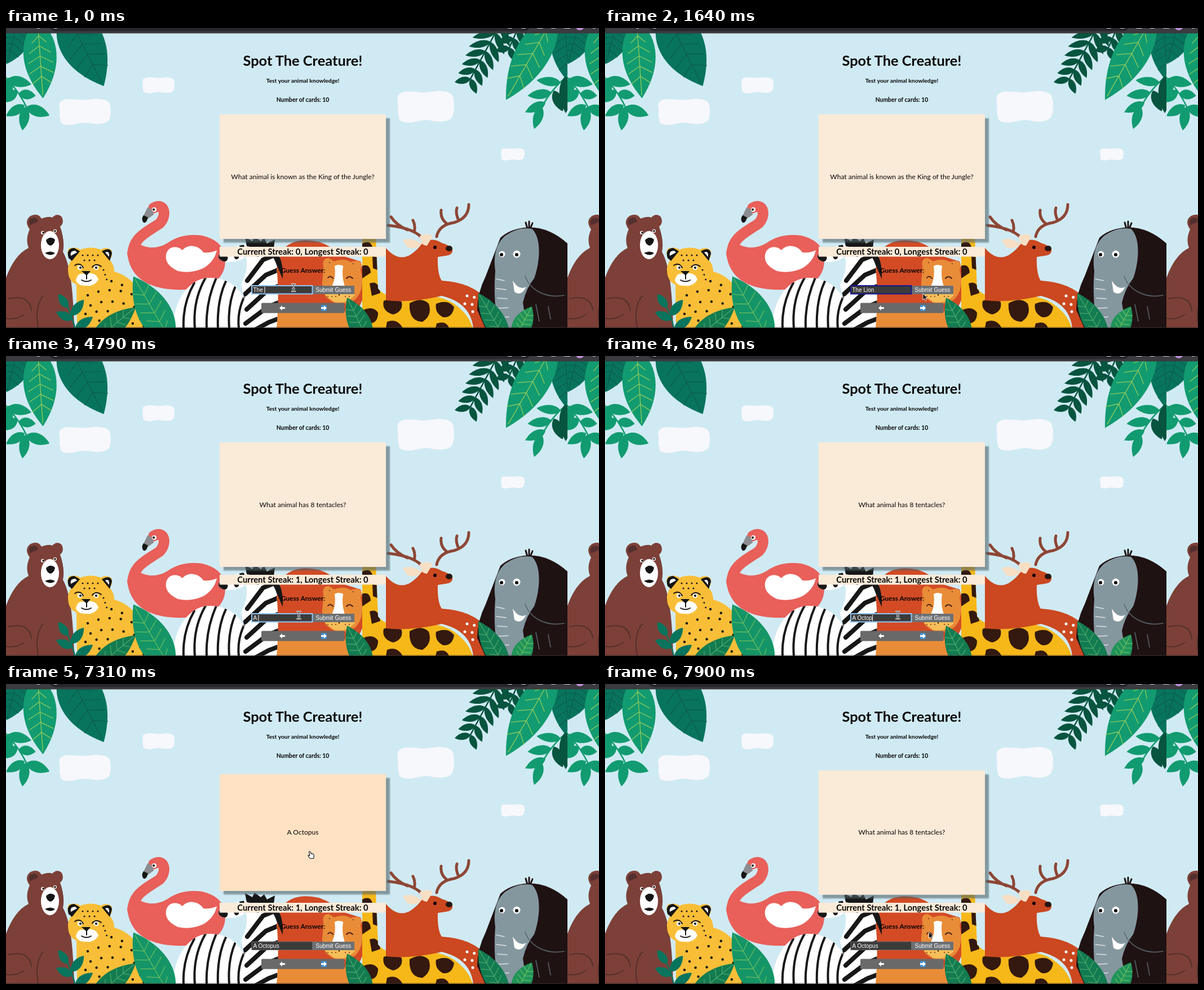
An HTML page that plays this animation: 1052 px wide and 532 px high, repeating every 8000 ms.

```html
<!DOCTYPE html>
<html lang="en">
<head>
<meta charset="utf-8">
<title>Animal quiz</title>
<style>
  html, body { margin: 0; width: 100%; height: 100%; overflow: hidden; background: #d0eaf3; }
  svg { display: block; width: 100%; height: 100%; }
  .line { fill: none; stroke-linecap: round; stroke-linejoin: round; }
  .page text { font-family: Lato, sans-serif; text-anchor: middle; fill: #050505; }
  .page .bold { font-weight: 700; }
  .form text { font: 10px "Liberation Sans", Arial, sans-serif; fill: #fff; white-space: pre; }
</style>
</head>
<body>
<svg viewBox="0 0 1052 532" preserveAspectRatio="none">
  <defs>
    <clipPath id="tileClip"><path d="M0 0H996V532H0Z"/></clipPath>
    <clipPath id="bodyClip"><path id="zebraBody" d="M296 532C298 482 325 443 361 443C395 443 416 462 424 484L417 455Q432 425 425 405Q414 418 386 414Q374 410 378 402Q400 386 425 384L448 374L472 385Q488 440 480 532Z"/></clipPath>
    <clipPath id="giraffeClip"><path id="giraffeBody" d="M632 532V368Q645 362 656 368L660 462Q676 482 715 476Q775 468 806 498Q822 512 828 532Z"/></clipPath>
    <filter id="soft" x="-10%" y="-10%" width="120%" height="120%"><feGaussianBlur stdDeviation="1"/></filter>
    <path id="cloud" d="M1 34C-2 14 6 1 22 3C38 3 42 7 55 5C72-1 88 0 96 13C101 25 101 65 97 81C91 97 76 99 62 94C47 88 38 95 25 99C10 101 1 94 3 79C-1 66 3 52 1 34Z"/>
    <path id="leaf" d="M0 0C.5 .15 .75 .55 0 1C-.75 .55 -.5 .15 0 0Z"/>
  </defs>

  <g id="tile" clip-path="url(#tileClip)">
    <path fill="#d0eaf3" d="M0 0H996V532H0Z"/>
    <g fill="#f7f8fb">
      <use href="#cloud" transform="translate(94 125) scale(.92 .47)"/>
      <use href="#cloud" transform="translate(242 87) scale(.57 .29)"/>
      <use href="#cloud" transform="translate(694 111) scale(1.01 .57)"/>
      <use href="#cloud" transform="translate(878 213) scale(.42 .22)"/>
    </g>

    <g id="flamingo">
      <path fill="#e95f5a" d="M215 396C218 447 260 466 316 464C370 462 394 440 388 402Q382 376 348 368Q312 363 287 381Q262 396 238 384Z"/>
      <path class="line" stroke="#e95f5a" stroke-width="19" d="M262 319C282 308 286 334 272 347C250 362 224 372 225 403"/>
      <path fill="#fff" d="M284 402C287 387 303 385 313 394C325 380 345 388 350 398Q366 399 374 394Q370 414 350 426Q328 436 305 431Q281 420 284 402Z"/>
      <path fill="#8b8d90" d="M251 318Q261 320 262 331L252 338L244 333Z"/>
      <path fill="#151515" d="M244 332L252 336Q249 347 244 345Q239 339 244 332Z"/>
      <circle cx="263" cy="322" r="4" fill="#fff"/><circle cx="262" cy="322" r="2"/>
    </g>

    <g id="bear">
      <path fill="#7c4038" d="M0 443Q15 402 40 390Q34 375 42 357Q31 342 44 333Q57 327 63 338Q75 333 82 336Q91 327 99 335Q104 346 96 352Q105 378 101 397C113 418 119 456 121 532H0Z"/>
      <path fill="#53302e" d="M42 350Q37 338 50 336Q56 337 57 343Z"/>
      <ellipse cx="78" cy="385" rx="16" ry="25" fill="#fff"/>
      <path d="M71 376Q79 368 87 375Q86 384 79 386Q72 384 71 376M69 399Q79 394 87 399Q80 406 69 399" fill="#151515"/>
      <circle cx="65" cy="363" r="3" fill="#fff"/><circle cx="87" cy="360" r="3" fill="#fff"/>
      <circle cx="66" cy="363" r="1.7"/><circle cx="87" cy="360" r="1.7"/>
      <path class="line" stroke="#57302c" stroke-width="2" d="M4 480Q42 472 45 501M66 475Q50 494 57 532M0 515Q19 518 32 508"/>
    </g>

    <g id="leopard">
      <path fill="#f9be37" d="M126 532L125 455Q109 449 110 425Q113 414 117 410Q104 400 112 391Q123 387 132 393Q151 386 168 393Q178 387 187 394Q190 404 184 411Q192 420 192 432C224 440 249 470 255 532Z"/>
      <path fill="#151515" d="M111 408Q106 391 121 390L131 396L117 413ZM170 396Q186 387 188 400L184 413Z"/>
      <path fill="#fff" d="M115 404Q113 395 123 395L126 398ZM176 398Q184 394 183 406ZM124 448Q126 433 140 436Q159 431 164 446Q157 459 141 457Q129 458 124 448Z"/>
      <path fill="#151515" d="M134 431L150 431L143 439Z"/>
      <path class="line" stroke="#151515" stroke-width="2" d="M122 421Q131 415 137 425M153 424Q160 416 169 423M143 438V445M134 447Q143 452 151 447"/>
      <circle cx="131" cy="425" r="4" fill="#fff"/><circle cx="160" cy="425" r="4" fill="#fff"/>
      <circle cx="132" cy="425" r="2"/><circle cx="160" cy="425" r="2"/>
      <g class="line" stroke="#181512">
        <path stroke-width="3" stroke-dasharray="0 9" d="M136 403H165M139 412H159M173 429L180 450"/>
        <path stroke-width="4.5" stroke-dasharray="0 20" d="M145 474Q190 454 236 478M150 492Q187 474 244 502M141 507Q190 493 247 520M146 523Q184 511 247 530M187 449L223 462"/>
      </g>
    </g>

    <g id="lion">
      <path fill="#d34b25" d="M469 532Q470 435 493 391Q514 370 555 379Q578 387 597 404L629 414Q640 450 633 480Q622 512 590 532Z"/>
      <path fill="#e98c38" d="M475 532V503Q502 484 546 498Q577 512 626 496L632 532ZM563 422Q560 408 573 408L582 414Q598 407 612 415Q629 409 631 421L629 429Q638 460 621 480Q607 492 584 488Q560 478 561 451Q563 436 563 422Z"/>
      <path fill="#fff" d="M583 422Q590 418 598 422Q595 440 601 458Q598 466 587 465Q577 464 579 456Q586 441 583 422Z"/>
      <path fill="#f7bf59" d="M566 474Q581 461 592 472Q606 461 619 473Q605 490 583 486Z"/>
      <path class="line" stroke="#4b231a" stroke-width="2" d="M571 443Q575 438 580 444M604 444Q609 438 615 444M583 462L591 466L599 462M591 466V474"/>
      <path class="line" stroke="#5f291b" stroke-width="2" stroke-dasharray="0 7" d="M571 476H586M602 476H615M574 416H578M616 418H621"/>
    </g>

    <g id="zebra">
      <use href="#zebraBody" fill="#fff"/>
      <g class="line" clip-path="url(#bodyClip)" stroke="#171717" stroke-width="4">
        <path d="M334 452Q313 489 315 532M354 443Q331 483 335 532M373 443Q354 487 356 532M391 447Q374 482 376 532M407 458Q393 490 396 532M422 478Q410 504 413 532"/>
        <path stroke-width="8" d="M490 397L456 411L428 448M495 424L461 438L424 472M495 453L463 466L427 499M495 482L464 495L425 524M495 511L466 522L435 539M440 382L447 402M417 383L423 399M399 388L409 406"/>
        <path stroke-width="13" d="M376 408L387 408"/>
      </g>
      <path fill="#171717" d="M427 387L424 371L437 378L441 370L452 378L458 373L463 382L477 375L475 390Q493 409 491 445L480 420Q472 396 451 391Z"/>
      <circle cx="413" cy="398" r="3"/>
    </g>

    <g id="giraffe">
      <use href="#giraffeBody" fill="#f6b719"/>
      <path clip-path="url(#giraffeClip)" fill="#33190f" d="M632 382Q646 375 650 388Q646 399 632 395ZM650 405L664 407V431L651 426ZM631 422Q646 417 647 434L632 444ZM645 453Q661 446 664 470L649 475ZM670 484Q690 475 702 486Q705 503 687 508Q666 502 670 484ZM716 488Q738 476 750 489Q757 509 739 521Q714 520 716 488ZM763 489Q784 480 795 495Q792 514 776 513Q760 506 763 489ZM634 500Q652 492 660 505Q660 524 644 524ZM676 521Q694 514 704 532H674ZM764 524Q781 518 786 532H762Z"/>
    </g>

    <g id="deer">
      <path class="line" stroke="#8d4635" stroke-width="5" d="M741 376Q727 355 678 350M712 358Q693 350 683 335M724 362Q727 351 722 341M764 370Q768 349 795 345Q821 337 821 313M782 347Q770 338 772 323M803 341Q797 328 800 319"/>
      <path fill="#cb4820" d="M674 483V390Q694 414 716 403Q731 393 737 383Q754 369 773 381Q789 386 792 393Q793 403 779 404L766 406Q765 436 773 448Q828 451 854 483L861 532H829Q824 487 773 475Q720 488 674 483Z"/>
      <path fill="#f6dfc5" d="M704 376Q719 370 738 383Q726 395 711 388ZM734 369Q747 362 757 369L747 386Q735 386 734 369Z"/>
      <ellipse cx="786" cy="391" rx="6" ry="5" fill="#241613"/><circle cx="761" cy="389" r="3"/>
      <path class="line" stroke="#fff" stroke-width="5" stroke-dasharray="0 13" d="M818 475L848 481M814 489L855 493M828 503L857 507"/>
    </g>

    <g id="elephant">
      <path fill="#1f1213" d="M836 500Q836 470 851 440L877 372Q893 357 920 354Q960 350 996 382V532H850Z"/>
      <path class="line" stroke="#1f1213" stroke-width="3" d="M925 356L922 345M928 355L928 343M930 356L934 346"/>
      <path fill="#84979f" d="M868 431Q862 388 886 368Q908 352 933 356C953 375 945 423 937 444Q923 461 917 487L924 532H873Q864 478 868 431Z"/>
      <path class="line" stroke="#5b666b" stroke-width="1.5" d="M921 440C930 466 960 480 990 474M940 490L946 520M962 494L966 516"/>
      <path fill="#fff" d="M899 448Q910 466 923 459Q914 477 902 468Z"/>
      <g fill="#fff"><circle cx="880" cy="401" r="5.5"/><circle cx="906" cy="401" r="6.5"/></g>
      <circle cx="879" cy="402" r="3"/><circle cx="906" cy="402" r="3"/>
      <path class="line" stroke="#dbe1e2" stroke-width="1.5" d="M870 445L884 448M870 462L887 464M872 479L889 480M874 497L891 496M877 514L892 512"/>
    </g>
    <g id="leaves"></g>
  </g>
  <use href="#tile" x="996"/>

  <path fill="#3a3b3e" d="M0 0H1052V9.5H0Z"/>
  <rect x="76" y="-20" width="855" height="25.5" rx="12" fill="#26272a"/>
  <path class="line" stroke="#c9cacd" stroke-width="2" d="M56 0H59M86 0H90M891 0H897M915 0H921M943 0H952M968 0H974M991 0H1000M1042 0H1045"/>
  <circle cx="1018" cy="-4" r="8" fill="#bd8bd2"/>
  <path fill="#30292a" opacity=".65" d="M0 530.5H1052V532H0Z"/>

  <g class="page">
    <text class="bold" x="526.5" y="67" font-size="25.4">Spot The Creature!</text>
    <text class="bold" x="526.5" y="97" font-size="10.3">Test your animal knowledge!</text>
    <text class="bold" x="526.5" y="131" font-size="10.4">Number of cards: 10</text>
    <g id="card">
      <path fill="#4f6269" opacity=".6" filter="url(#soft)" d="M386 160H681V380.5H386Z"/>
      <path id="face" d="M379 153H674V374H379Z"/>
      <text id="question" x="526.5" y="267.5" font-size="12.05"></text>
    </g>
    <path fill="#faead8" d="M379 388H674V405.5H379Z"/>
    <text id="streak" class="bold" x="526.5" y="401.5" font-size="14.8"></text>
    <text class="bold" x="527" y="434" font-size="12">Guess Answer:</text>
  </g>

  <g class="form">
    <rect id="submit" x="543" y="457" width="75" height="15" rx="1"/>
    <text x="549.5" y="467.7">Submit Guess</text>
    <rect id="field" x="436" y="457" width="107.5" height="14.5" fill="#3b3b3b"/>
    <text id="typed" x="438.5" y="467.7"></text>
    <path id="caret" stroke="#fff" d="M0 459V470"/>
    <rect x="453" y="487.5" width="147.5" height="18" rx="2" fill="#696969"/>
    <path id="next" fill="#797979" d="M526.5 487.5H598.5Q600.5 487.5 600.5 489.5V503.5Q600.5 505.5 598.5 505.5H526.5Z"/>
    <path id="arrow" fill="#fff" d="M485 496.5L490 492V495H495V498H490V501Z"/>
    <rect x="559" y="491.5" width="10" height="10" rx="1" fill="#3f93d3"/>
    <use href="#arrow" transform="translate(1054 0) scale(-1 1)"/>
  </g>

  <g id="cursor" stroke-linejoin="round">
    <g id="beam" class="line">
      <path stroke="#fff" stroke-width="2.5" d="M-3-6Q0-6 0-4Q0-6 3-6M0-4V5M-3 7Q0 7 0 5Q0 7 3 7M-1.5 2H1.5"/>
      <path stroke="#222" d="M-3-6Q0-6 0-4Q0-6 3-6M0-4V5M-3 7Q0 7 0 5Q0 7 3 7M-1.5 2H1.5"/>
    </g>
    <path id="pointer" fill="#000" stroke="#fff" stroke-width=".9" d="M0 0V11L2.5 8.7L4.3 12.5L6.2 11.6L4.5 8H8Z"/>
    <path id="hand" fill="#fff" stroke="#111" stroke-width="1.1" d="M-3.5-5Q-2.5-7-1-5.2L.4-1.8Q2-3 3-1.5Q4.5-2 5 0L5.4 3.3L4.4 6.5H-1.5L-5 2Q-5.4-.2-3.3.6L-2 1.6Z"/>
  </g>
</svg>
<script>
const $ = id => document.getElementById(id);
const LIGHT = '#129b70', DARK = '#08745d', DEEP = '#07543f';

// A leaf grows from (x, y); angle 0 points down.
const leaf = (x, y, angle, length, width, fill, vein = 0) => {
  let ribs = '';
  if (vein) for (let v = .2; v < .85; v += .13) {
    const reach = .36 * Math.sin(Math.PI * v);
    ribs += `M0 ${v}L${reach} ${v + .09}M0 ${v}L${-reach} ${v + .09}`;
  }
  return `<g transform="translate(${x} ${y}) rotate(${angle}) scale(${width} ${length})">
    <use href="#leaf" fill="${fill}"/>` + (vein ? `<path d="M0 0V.96${ribs}" fill="none"
    stroke="${vein}" stroke-width="1.3" vector-effect="non-scaling-stroke"/>` : '') + '</g>';
};
const stem = (d, color) => `<path class="line" d="${d}" stroke="${color}" stroke-width="2.5"/>`;
const fern = (x, y, dx, dy, count, size) => {
  let out = stem(`M${x} ${y}l${dx} ${dy}`, DEEP);
  for (let i = 0; i < count; i++) {
    const k = i / (count - 1), s = size * (1 - .35 * k);
    for (const a of [-22, 78]) out += leaf(x + dx * k, y + dy * k, a, s, 13, DEEP);
  }
  return out;
};

$('leaves').innerHTML =
  leaf(25, -25, 15, 92, 62, DARK, '#0b5e4d') +
  leaf(103, -35, -27, 155, 84, DARK, '#0b5e4d') +
  leaf(56, -14, -4, 139, 62, LIGHT, '#8fcb5c') +
  stem('M-4 84Q24 112 39 146', LIGHT) +
  leaf(3, 91, -78, 43, 20, LIGHT) + leaf(5, 88, 5, 38, 19, LIGHT) +
  leaf(20, 111, 53, 34, 19, LIGHT) + leaf(23, 116, -82, 30, 18, LIGHT) +
  leaf(36, 140, -70, 44, 21, LIGHT) + leaf(35, 140, 8, 42, 19, LIGHT) +
  leaf(33, 137, 60, 38, 18, LIGHT) +
  fern(877, -8, -53, 98, 7, 44) + fern(915, -15, -22, 50, 4, 38) +
  leaf(990, -25, -4, 122, 58, DARK, '#0b5e4d') +
  leaf(975, -25, 30, 176, 64, LIGHT, '#8fcb5c') +
  stem('M1000 82Q968 106 949 143', LIGHT) +
  leaf(984, 97, 96, 43, 17, LIGHT) + leaf(968, 115, 83, 43, 18, LIGHT) +
  leaf(957, 132, 64, 40, 17, LIGHT) + leaf(950, 139, 18, 42, 18, LIGHT) +
  leaf(972, 111, -23, 40, 19, DEEP) + leaf(993, 85, 0, 66, 24, DEEP) +
  stem('M124 540Q118 510 106 488', DARK) +
  leaf(110, 496, 145, 30, 15, DARK) + leaf(116, 510, 218, 36, 17, DARK) +
  leaf(118, 517, 115, 32, 16, DARK) + leaf(123, 534, 235, 38, 17, DARK) +
  leaf(150, 560, 231, 103, 40, '#137b50', '#48a66c') +
  leaf(295, 560, 150, 138, 62, '#159567', '#66bb61') +
  leaf(645, 560, 154, 91, 42, '#137b50', '#48a66c') +
  leaf(890, 560, 150, 104, 40, '#137b50', '#48a66c') +
  leaf(902, 552, 208, 66, 36, '#20945a', '#66bb61');

// Each track holds [start ms, ...values]; values stay until the next entry.
const typed = [[0, 'The '], [450, 'The L'], [600, 'The Li'], [750, 'The Lio'], [890, 'The Lion'],
  [2690, ''], [4190, 'A'], [4790, 'A '], [4940, 'A O'], [5080, 'A Oc'], [5530, 'A Oct'],
  [5680, 'A Octo'], [6280, 'A Octop'], [6430, 'A Octopu'], [6580, 'A Octopus']];
const focus = [[0, 'on'], [1640, 'fading'], [1790, 'off'], [3440, 'on'], [6870, 'off']];
const cursor = [[0, 'beam', 510, 460], [1040, 'beam', 525, 462], [1190, 'pointer', 575, 466],
  [1340, 'pointer', 600, 474], [1490, 'pointer', 578, 476], [1640, 'pointer', 564, 471],
  [1790, 'pointer', 568, 467], [2390, 'pointer', 569, 476], [2540, 'pointer', 567, 486],
  [2690, 'hand', 565, 497], [2990, 'beam', 535, 466], [3140, 'beam', 519.5, 459],
  [6730, 'pointer', 525, 420], [6870, 'hand', 534, 350], [7020, 'hand', 541, 303],
  [7900, 'pointer', 574.5, 440]];
const tilt = [[0, 1], [7310, .937], [7450, 1], [7750, .92], [7900, .998]];
const question = [[0, 'What animal is known as the King of the Jungle?'],
  [2690, 'What animal has 8 tentacles?'], [7310, 'A Octopus'], [7750, 'What animal has 8 tentacles?']];
const rings = { on: ['#8fc5f5', 2], fading: ['#17178f', 2], off: ['#686868', 1] };

const at = (track, t) => track.findLast(step => step[0] <= t).slice(1);
const between = (t, from, to) => t >= from && t < to;
const show = (id, on) => $(id).setAttribute('visibility', on ? 'visible' : 'hidden');

function draw(t) {
  const [text] = at(typed, t), [state] = at(focus, t), [shape, x, y] = at(cursor, t);
  const empty = text === '', active = state === 'on';
  $('typed').textContent = text || 'Guess';
  $('typed').style.fill = empty ? '#757575' : '#fff';
  const caretX = 439 + (empty ? 0 : $('typed').getComputedTextLength());
  $('caret').setAttribute('transform', `translate(${caretX} 0)`);
  show('caret', active);
  $('field').setAttribute('stroke', rings[state][0]);
  $('field').setAttribute('stroke-width', rings[state][1]);

  $('question').textContent = at(question, t)[0];
  $('face').setAttribute('fill', between(t, 7310, 7750) ? '#fee2c3' : '#faead8');
  $('card').setAttribute('transform', `translate(0 263.5) scale(1 ${at(tilt, t)[0]}) translate(0 -263.5)`);
  $('streak').textContent = `Current Streak: ${t < 2390 ? 0 : 1}, Longest Streak: 0`;
  $('submit').setAttribute('fill', between(t, 1790, 2090) ? '#7d8083' : '#6d7073');
  show('next', between(t, 2690, 2990));

  for (const id of ['beam', 'pointer', 'hand']) show(id, id === shape);
  $('cursor').setAttribute('transform', `translate(${x} ${y})`);
}

function loop() {
  draw(performance.now() % 8000);
  requestAnimationFrame(loop);
}
loop();
</script>
</body>
</html>
```
